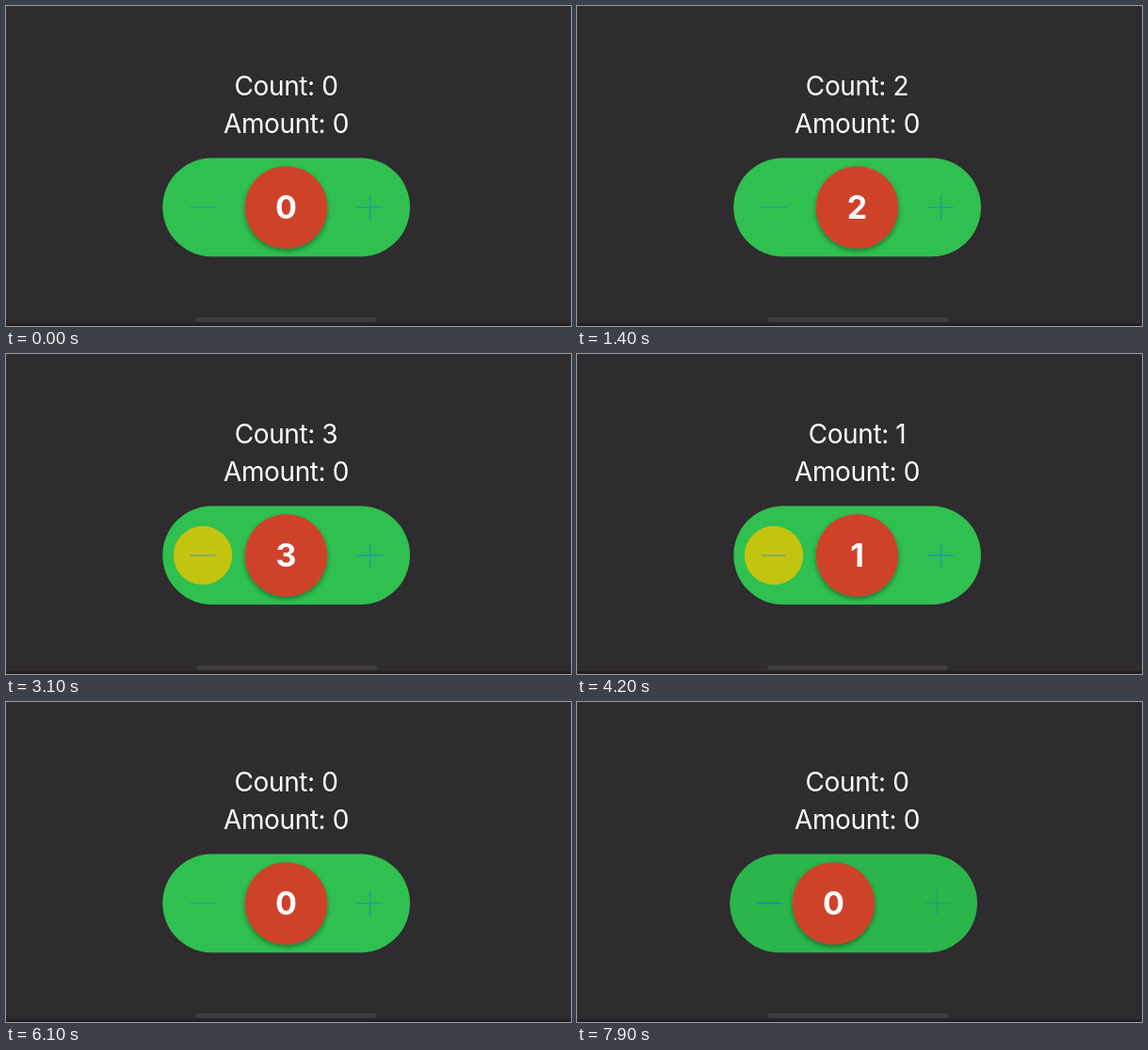
Write an HTML page that moves like this. It is 600 px wide and 340 px high and loops after 8000 ms.

```html
<!DOCTYPE html>
<html lang="en">
<head>
<meta charset="utf-8">
<title>Stepper</title>
<style>
  html, body { margin: 0; height: 100%; overflow: hidden; background: #2e2c2e; }
  svg { display: block; width: 100vw; height: 100vh; }
  text { font-family: Inter, "Open Sans", sans-serif; fill: #fff; text-anchor: middle; }
  .label { font-size: 28px; letter-spacing: -.4px; }
  .digit { font-size: 34px; font-weight: 650; }
  .icon { stroke: #0a7aff; stroke-width: 1.3; fill: none; }
  .glow { fill: #c3c40f; }
</style>
</head>
<body>
<svg viewBox="0 0 600 340">
  <defs>
    <filter id="shadow" x="-20%" y="-20%" width="140%" height="140%">
      <feDropShadow dx="0" dy="2.5" stdDeviation="2.5" flood-color="#000" flood-opacity=".4"/>
    </filter>
  </defs>
  <rect y="337" width="600" height="3" fill="#231f20"/>
  <rect x="202" y="331" width="192" height="4.5" rx="2.25" fill="#403e40"/>
  <text class="label" id="count" x="297.5" y="95">Count: 0</text>
  <text class="label" x="297.5" y="135">Amount: 0</text>
  <g id="pill">
    <rect id="track" x="166.3" y="161.5" width="262.7" height="104.7" rx="52.35"/>
    <circle class="glow" id="minusGlow" cx="209" cy="214" r="31.2"/>
    <circle class="glow" id="plusGlow" cx="386.5" cy="214" r="31.2"/>
    <path class="icon" id="minus" d="M195.7 214h26.6"/>
    <path class="icon" id="plus" d="M373.2 214h26.6M386.5 200.7v26.6"/>
  </g>
  <g id="knob">
    <circle cx="297.5" cy="214" r="43.8" fill="#cf432b" filter="url(#shadow)"/>
    <text class="digit" id="oldDigit" x="297.5" y="226">0</text>
    <text class="digit" id="newDigit" x="297.5" y="226">0</text>
  </g>
</svg>
<script>
const LOOP = 8000, FADE = 350, DRAG = 7900;
// [time, count]
const counts = [[-1000, 0], [230, 1], [630, 2], [2025, 3], [3250, 2], [3740, 1], [4650, 0], [6250, 1], [7130, 0]];
// [press, release, fade time]
const plusTaps = [[100, 200, 150], [480, 570, 150], [1800, 2025, FADE], [6150, 6220, 70]];
const minusTaps = [[2750, 3250, FADE], [3550, 3740, FADE], [4000, 4650, FADE], [6850, 7000, 200]];

const $ = id => document.getElementById(id);
const clamp = v => Math.max(0, Math.min(1, v));
const fade = (id, v) => $(id).setAttribute("opacity", v);
const move = (id, x) => $(id).setAttribute("transform", `translate(${x} 0)`);
const glow = (taps, t) => Math.max(...taps.map(([on, off, out]) =>
  Math.min(clamp((t - on) / 100), clamp(1 - (t - off) / out))));

function draw(t) {
  const i = counts.findLastIndex(c => c[0] <= t);
  const [start, value] = counts[i];
  const mix = clamp((t - start) / FADE);
  $("count").textContent = "Count: " + value;
  $("newDigit").textContent = value;
  $("oldDigit").textContent = i ? counts[i - 1][1] : value;
  fade("newDigit", mix);
  fade("oldDigit", 1 - mix);
  fade("plusGlow", glow(plusTaps, t));
  fade("minusGlow", glow(minusTaps, t));

  const drag = t >= DRAG;
  move("pill", drag ? -4 : 0);
  move("knob", drag ? -25 : 0);
  fade("minus", drag ? .9 : .5);
  fade("plus", drag ? .3 : .5);
  $("track").setAttribute("fill", drag ? "#2bb54b" : "#2fc04f");
}

function tick() {
  draw(performance.now() % LOOP);
  requestAnimationFrame(tick);
}
tick();
</script>
</body>
</html>
```
